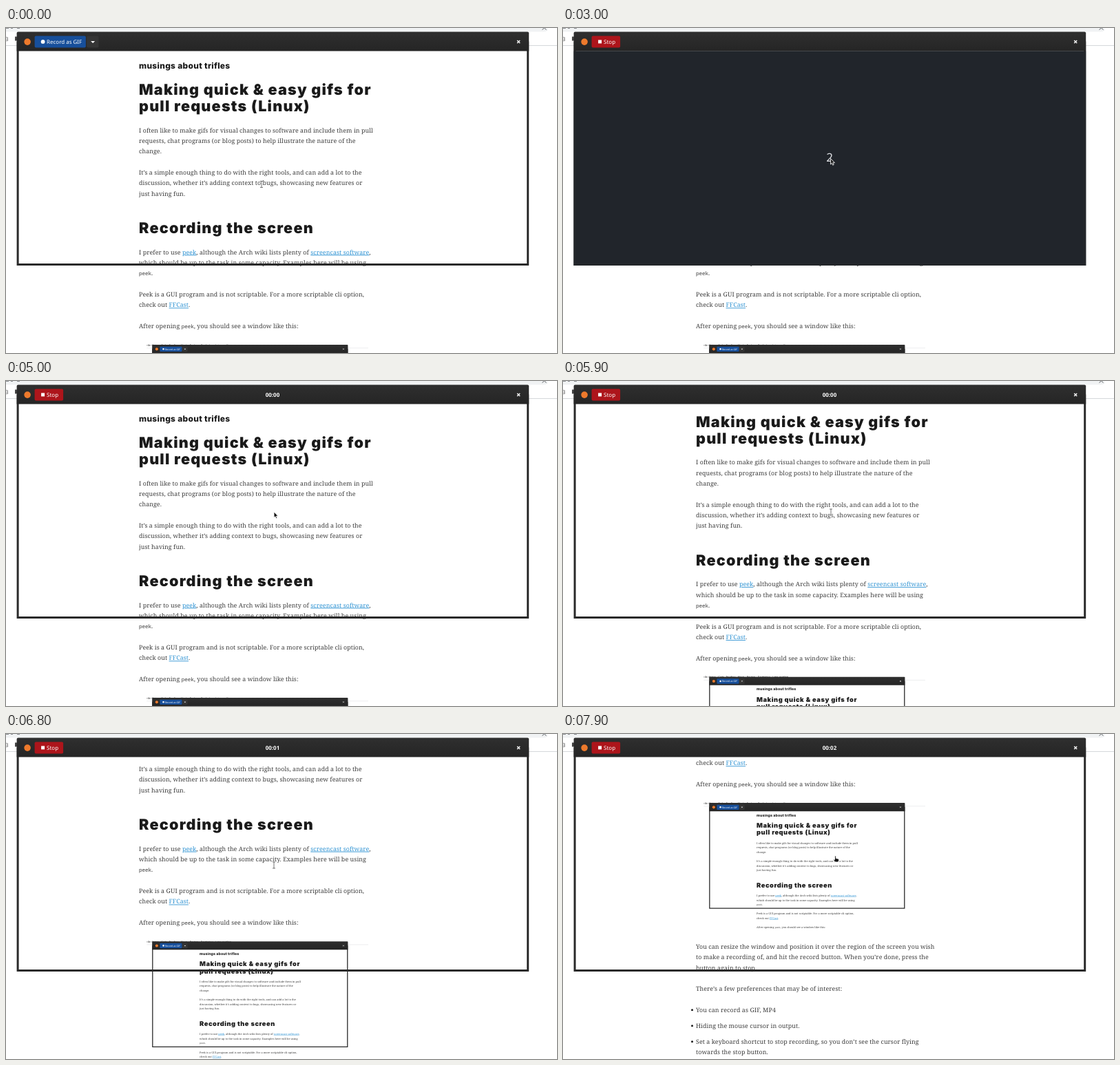
An HTML page that plays this animation: 800x472 px, repeating every 8000 ms.

```html
<!DOCTYPE html>
<html lang="en">
<meta charset="utf-8">
<title>Screen recorder demo</title>
<style>
html, body { margin: 0; height: 100%; overflow: hidden; background: #fff; }
svg { display: block; width: 100vw; height: 100vh; }
text { white-space: pre; text-rendering: geometricPrecision; }
.body { font: 300 8.85px "Noto Serif", serif; fill: #3c3c3c; letter-spacing: .09px; }
.h1 { font: 900 21.6px Inter, sans-serif; fill: #1a1a1a; letter-spacing: 1.2px; }
.site { font: 800 12px Inter, sans-serif; fill: #1a1a1a; letter-spacing: .3px; }
.code { font: 7.5px "Noto Sans Mono", monospace; letter-spacing: 0; }
.link { fill: #2f93d3; text-decoration: underline; text-decoration-thickness: .5px; text-underline-offset: 1.8px; }
.ui { font: 7.95px "Noto Sans", sans-serif; fill: #fff; }
.bold { font-weight: 700; }
#count { font: 17px "Noto Sans", sans-serif; fill: #d8dade; }
</style>
<svg viewBox="0 0 800 472">
  <defs>
    <linearGradient id="bar" x2="0" y2="1">
      <stop stop-color="#2f2f2f"/><stop offset="1" stop-color="#252525"/>
    </linearGradient>
    <clipPath id="shot"><rect width="800" height="445"/></clipPath>
  </defs>
  <g id="page"></g>
  <g id="chrome">
    <path d="M0 0H800V25.5H0Z" fill="#fff"/>
    <path d="M0 0H785Q790 5 780 5.5H0Z" fill="#f1f3f4"/>
    <path d="M0 25.5H800" stroke="#d5d7da"/>
    <path d="M0 .5H4M7 .5H10M16 .5H20" stroke="#8a8d91"/>
    <path d="M778.5 2.5L781.5 0L784.5 2.5" fill="none" stroke="#5f6368"/>
    <path d="M13 12.5H16V18.5H13Z" fill="#444"/>
    <text class="ui" x="-1" y="18.5" style="fill:#555">3</text>
  </g>
  <g id="window"></g>
  <g id="cursor"></g>
</svg>
<script>
const $ = id => document.getElementById(id);
const link = s => `<tspan class="link">${s}</tspan>`;
const peek = '<tspan class="code">peek</tspan>';
const text = (cls, x, y, s) => `<text class="${cls}" x="${x}" y="${y}">${s}</text>`;
const lines = (y, ...rows) => rows.map((s, i) => text('body', 193, y + i * 15.35, s)).join('');
const bullet = y => `<circle cx="187.5" cy="${y - 3}" r="1.5" fill="#1a1a1a"/>`;

const intro =
  text('site', 193, 59.3, 'musings about trifles') +
  text('h1', 193, 97.3, 'Making quick &amp; easy gifs for') +
  text('h1', 193, 121.3, 'pull requests (Linux)') +
  lines(151.7, 'I often like to make gifs for visual changes to software and include them in pull',
    'requests, chat programs (or blog posts) to help illustrate the nature of the', 'change.') +
  lines(212.9, 'It’s a simple enough thing to do with the right tools, and can add a lot to the',
    'discussion, whether it’s adding context to bugs, showcasing new features or', 'just having fun.') +
  text('h1', 193, 298, 'Recording the screen') +
  lines(328.5, `I prefer to use ${link('peek')}, although the Arch wiki lists plenty of ${link('screencast software')},`,
    'which should be up to the task in some capacity. Examples here will be using', peek + '.') +
  lines(390, 'Peek is a GUI program and is not scriptable. For a more scriptable cli option,',
    `check out ${link('FFCast')}.`) +
  lines(436.2, `After opening ${peek}, you should see a window like this:`);

const rest =
  lines(671.8, 'You can resize the window and position it over the region of the screen you wish',
    'to make a recording of, and hit the record button. When you’re done, press the',
    'button again to stop.') +
  lines(733.2, 'There’s a few preferences that may be of interest:') +
  lines(763.8, 'You can record as GIF, MP4') +
  lines(786.8, 'Hiding the mouse cursor in output.') +
  lines(809.8, 'Set a keyboard shortcut to stop recording, so you don’t see the cursor flying',
    'towards the stop button.') +
  [763.8, 786.8, 809.8].map(bullet).join('');

// Frame, title bar, logo dot and close mark, with the top left corner at 0,0
const frame = (w, h) => `
  <path d="M1.5 14V${h - 1.5}H${w - 1.5}V14" fill="none" stroke="#2a2a2a" stroke-width="3"/>
  <path d="M0 28V2Q0 0 2 0H${w - 2}Q${w} 0 ${w} 2V28Z" fill="url(#bar)"/>
  <circle cx="15.5" cy="14.5" r="4.8" fill="#ee7a2c"/>
  <path d="M${w - 17} 12.5l4 4m0 -4l-4 4" stroke="#fff" stroke-width="1.4"/>`;
const button = (x, w, fill) => `<rect x="${x}" y="6" width="${w}" height="17" rx="2" fill="${fill}"/>`;
const record = hover => `
  ${button(26, 74.3, hover ? '#103d78' : '#174f9b')}
  <circle cx="38" cy="14.3" r="2.9" fill="#fff"/>${text('ui', 43.5, 17.4, 'Record as GIF')}
  ${button(101.5, 17.5, '#353535')}
  <path d="M107.5 13.3h6l-3 3.2Z" fill="#fff"/>`;
const stop = hover => `
  ${button(26, 41.5, hover ? '#92131a' : '#ad151b')}
  <path d="M35.5 11.8h5v5h-5Z" fill="#fff"/>${text('ui', 43.5, 17.4, 'Stop')}`;

const shot = `<g transform="translate(197.7 454) scale(.432)">
  <g clip-path="url(#shot)">${intro}</g>
  <path d="M15 25H760" stroke="#d5d7da"/>
  <g style="filter:invert(.87)">${text('ui bold', 15, 18,
    '▪ It ▪ Notes ▪ Code ▪ Reading ▪ Music ▪ Recipes ▪ Gardening ▪ Later reading')}</g>
  <g transform="translate(33.5 14)">${frame(658, 356)}${record(false)}</g></g>`;
$('page').innerHTML = intro + shot + rest;
$('window').innerHTML = `<g transform="translate(15.6 5.6)">
  <path id="shade" d="M0 28H743.6V339.4H0Z" fill="#21252b"/>${frame(743.6, 339.4)}
  <path id="edge" d="M0 28H743.6V339.4H0Z" fill="#21252b"/>
  <g id="buttons"></g>
  <text id="timer" class="ui bold" x="371.4" y="17.4" text-anchor="middle"></text>
  <text id="count" x="371.4" y="188.4" text-anchor="middle"></text></g>`;

const outlined = (d, fill, line) => `<path d="${d}" fill="${fill}" stroke="${line}" stroke-width=".9"/>`;
const strokes = (d, w, color) => [[w + 1.6, '#fff'], [w, color]].map(([n, c]) =>
  `<path d="${d}" fill="none" stroke="${c}" stroke-width="${n}"/>`).join('');
const arrowPath = 'M0 0V8.5L1.9 6.8L3.2 9.7L4.7 9L3.4 6.2H6Z';
const cursors = {
  beam: strokes('M-2 -4.5H2M0 -4.5V4.5M-2 4.5H2', .8, '#555'),
  cross: strokes('M-4 -4L4 4M4 -4L-4 4', 1.5, '#111'),
  arrow: outlined(arrowPath, '#111', '#fff'),
  pale: outlined(arrowPath, '#222', '#eee'),
  hand: outlined('M0 0Q1 -1 1.8 0V3L5 3.7Q6.5 4.2 6 6L5.3 8.5H1L-2 5.5Q-2 4 0 5Z', '#111', '#fff'),
};

// Linear interpolation through [time, value] points
function track(t, keys) {
  if (t <= keys[0][0]) return keys[0][1];
  for (let i = 1; i < keys.length; i++) {
    const [t0, a] = keys[i - 1], [t1, b] = keys[i];
    if (t <= t1) return a + (b - a) * (t - t0) / (t1 - t0);
  }
  return keys.at(-1)[1];
}
const scrollKeys = [[5700, 0], [5800, 8], [6100, 75], [6200, 84], [6300, 84], [6400, 90.7],
  [7200, 227], [7300, 242.3], [7600, 322], [7700, 322], [7900, 360]];
const shadeKeys = [[1600, 0], [1700, .35], [1800, .7], [1900, .95], [2300, .95], [2500, 1]];

function pointer(t) {
  if (t < 3000) {
    const p = track(t, [[700, 0], [1600, 1]]), e = p * p * (3 - 2 * p);
    const x = 371 - 298 * e, y = 227 - 205 * e;
    return [y < 34 ? 'cross' : t < 800 ? 'beam' : 'arrow', x, y];
  }
  if (t < 5000) return ['pale', 388.5, 189.5];
  if (t < 5800) return ['arrow', 389, 190];
  if (t < 7200) return ['beam', 389, 190.5];
  if (t < 7700) return ['arrow', 388, 189.5];
  return ['hand', 394.5, 177.5];
}

function draw(now) {
  const t = Math.floor(now % 8000 / 100) * 100;
  $('page').setAttribute('transform', `translate(0 ${-track(t, scrollKeys)})`);
  const shade = t < 5000 ? track(t, shadeKeys) : 0;
  $('shade').setAttribute('opacity', shade);
  $('edge').setAttribute('opacity', shade * .7);
  $('buttons').innerHTML = t < 1700 ? record(t >= 1500) : stop(t < 3000);
  $('timer').textContent = t < 5000 ? '' : '00:0' + Math.floor((t - 5000) / 1000);
  $('count').textContent = t < 1900 || t >= 5000 ? '' : t < 3000 ? 3 : t < 4000 ? 2 : 1;
  const [kind, x, y] = pointer(t);
  $('cursor').innerHTML = cursors[kind];
  $('cursor').setAttribute('transform', `translate(${x} ${y})`);
  requestAnimationFrame(draw);
}
requestAnimationFrame(draw);
</script>
</html>
```
